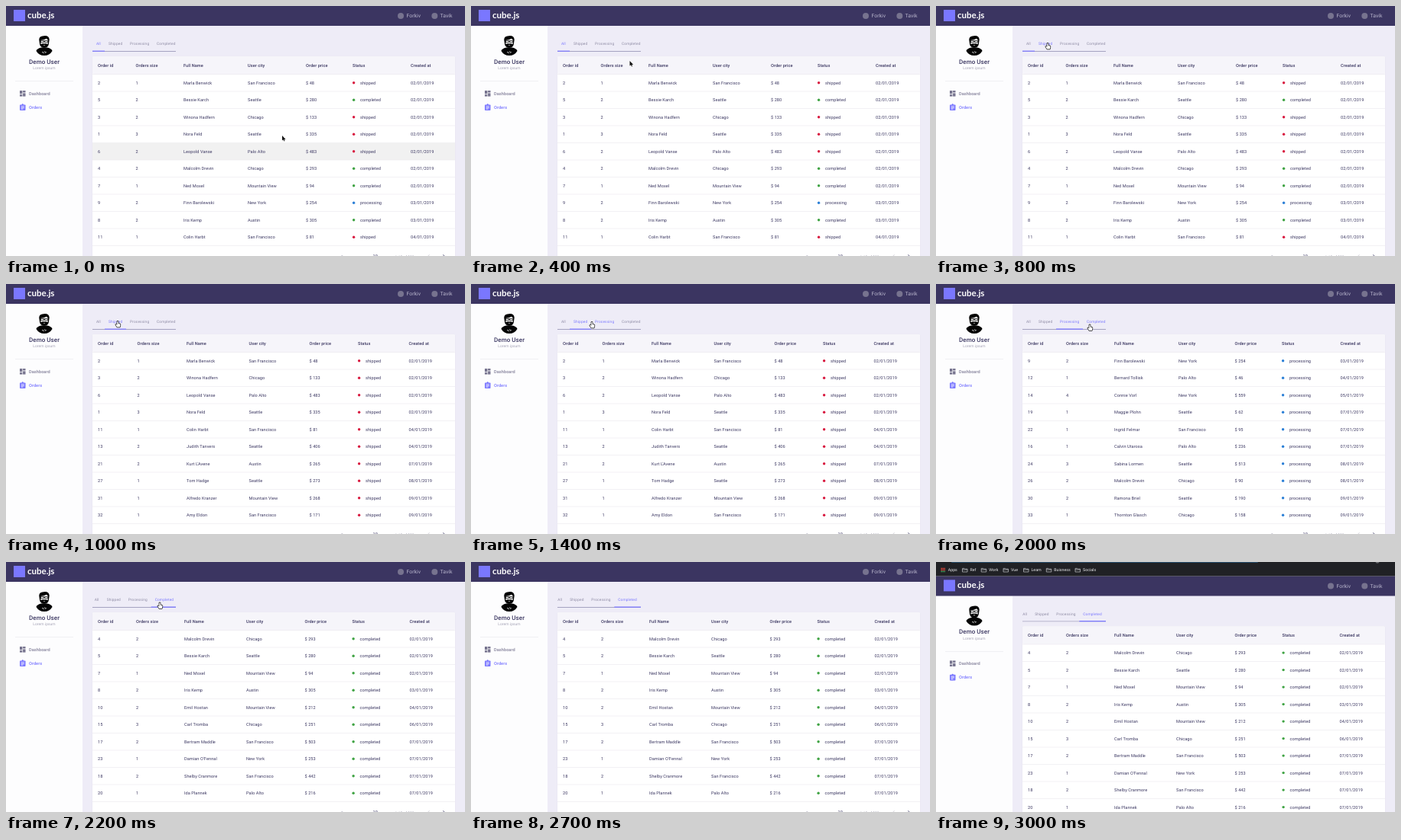
Animation, 600 px wide and 328 px high, one loop 3.3 s. Source, as an HTML page with a canvas:

```html
<!DOCTYPE html>
<html lang="en">
<head>
<meta charset="utf-8">
<title>Orders dashboard</title>
<style>
html, body { margin: 0; width: 100%; height: 100%; overflow: hidden; background: #eeecf7; }
canvas { display: block; width: 600px; height: 328px; }
</style>
</head>
<body>
<canvas id="stage"></canvas>
<script>
const canvas = document.getElementById('stage');
const ctx = canvas.getContext('2d');
const dpr = window.devicePixelRatio || 1;
canvas.width = 600 * dpr;
canvas.height = 328 * dpr;

const LOOP = 3300, STEP = 100, BAR = 18.4;
const INK = '#3d3963', ACCENT = '#7a77ff', MUTED = '#8d8aa3', NAVY = '#3b3561';
const STATUS = { shipped: '#d8193f', completed: '#3fa343', processing: '#2b7fd6' };

// id, size, name, city, price, status initial, day
const orders = {};
`2|1|Marla Benwick|San Francisco|48|s|2
5|2|Bessie Karch|Seattle|280|c|2
3|2|Winona Hadfern|Chicago|133|s|2
1|3|Nora Feld|Seattle|335|s|2
6|2|Leopold Vanse|Palo Alto|483|s|2
4|2|Malcolm Drevin|Chicago|293|c|2
7|1|Ned Moxel|Mountain View|94|c|2
9|2|Finn Barolewski|New York|254|p|3
8|2|Iris Kemp|Austin|305|c|3
11|1|Colin Harbt|San Francisco|81|s|4
13|2|Judith Tanvers|Seattle|406|s|4
21|2|Kurt L'Avene|Austin|265|s|7
27|1|Tom Hadge|Seattle|273|s|8
31|1|Alfredo Kranzer|Mountain View|268|s|9
32|1|Amy Eldon|San Francisco|171|s|9
12|1|Bernard Tollisk|Palo Alto|46|p|4
14|4|Connie Vorl|New York|559|p|5
19|1|Maggie Plohn|Seattle|62|p|7
22|1|Ingrid Felmar|San Francisco|95|p|7
16|1|Calvin Utarosa|Palo Alto|236|p|7
24|3|Sabina Lormen|Seattle|513|p|8
26|2|Malcolm Drevin|Chicago|90|p|8
30|2|Ramona Briel|Seattle|190|p|9
33|1|Thornton Glasch|Chicago|158|p|9
10|2|Emil Hostan|Mountain View|212|c|4
15|3|Carl Tromba|Chicago|251|c|6
17|2|Bertram Maddle|San Francisco|503|c|7
23|1|Damian O'Fennal|New York|253|c|7
18|2|Shelby Cranmore|San Francisco|442|c|7
20|1|Ida Plannek|Palo Alto|216|c|7`.split('\n').forEach(line => {
  const [id, size, name, city, price, initial, day] = line.split('|');
  const status = Object.keys(STATUS).find(s => s[0] === initial);
  orders[id] = [id, size, name, city, '$ ' + price, status, `0${day}/01/2019`];
});

const HEADS = ['Order id', 'Orders size', 'Full Name', 'User city', 'Order price', 'Status', 'Created at'];
const VIEWS = [
  { ids: [2, 5, 3, 1, 6, 4, 7, 9, 8, 11], cols: [120, 169.5, 232, 316, 392, 453, 529] },
  { ids: [2, 3, 6, 1, 11, 13, 21, 27, 31, 32], cols: [120, 171.5, 236, 317.5, 396.5, 460, 526.5] },
  { ids: [9, 12, 14, 19, 22, 16, 24, 26, 30, 33], cols: [120, 170, 233, 317, 390.5, 452, 528.5] },
  { ids: [4, 5, 7, 8, 10, 15, 17, 23, 18, 20], cols: [120, 170, 233, 314, 390.5, 452.5, 527.5] }
];
const TABS = ['All', 'Shipped', 'Processing', 'Completed'];
const EDGES = [113, 129, 157, 192, 226.7];

// Keyframes: [step, value, ...]
const TAB_POS = [[8, 0], [9, .7], [10, 1], [15, 1], [16, 1.7], [17, 2], [20, 2], [21, 2.7], [22, 3]];
const TAB_SCROLL = [[21, 0], [23, 4.7]];
const BAR_SLIDE = [[28, 0], [30, BAR]];
const POINTER = [[0, 361, 170], [1, 345, 152], [3, 250, 91], [5, 165, 53], [6, 146, 48.5],
  [12, 146, 48.5], [15, 164, 50], [18, 164, 50], [20, 201, 53]];

const ARROW = new Path2D('M0 0V6.6L1.5 5.3 2.5 7.4 3.5 7 2.6 4.9H4.6Z');
const HAND = new Path2D('M-.7 .7Q0-.3 .7 .7V3.2L3 3.9Q3.8 4.3 3.5 5.6L2.8 8H-.8L-2.8 5Q-2.6 4-1.4 4.6L-.7 5.2Z');

function at(keys, t, i = 1) {
  const next = keys.findIndex(k => k[0] > t);
  if (next < 0) return keys[keys.length - 1][i];
  if (next === 0) return keys[0][i];
  const a = keys[next - 1], b = keys[next];
  return a[i] + (b[i] - a[i]) * (t - a[0]) / (b[0] - a[0]);
}

function rect(x, y, w, h, color, r = 0) {
  ctx.fillStyle = color;
  ctx.beginPath();
  ctx.roundRect(x, y, w, h, r);
  ctx.fill();
}

function disc(x, y, r, color) {
  ctx.fillStyle = color;
  ctx.beginPath();
  ctx.arc(x, y, r, 0, 7);
  ctx.fill();
}

function shape(d, fill, stroke, width = 1) {
  const path = typeof d === 'string' ? new Path2D(d) : d;
  if (stroke) {
    ctx.strokeStyle = stroke;
    ctx.lineWidth = width;
    ctx.stroke(path);
  }
  if (fill) {
    ctx.fillStyle = fill;
    ctx.fill(path);
  }
}

// y is the middle of the capitals
function text(s, x, y, { size = 5.6, color = INK, weight = 400, align = 'left', gap = .06, font = 'Roboto' } = {}) {
  ctx.font = `${weight} ${size}px ${font}, sans-serif`;
  ctx.letterSpacing = gap + 'px';
  ctx.textAlign = align;
  ctx.fillStyle = color;
  ctx.fillText(s, x, y + size * .355);
}

function drawHeader() {
  rect(0, 0, 600, 26, NAVY);
  rect(10, 5, 15, 15, ACCENT);
  text('cube.js', 28, 12, { size: 11.5, color: '#fff', weight: 700, gap: 0, font: 'Lato' });
  const link = { size: 6.8, color: '#b9b6cd' };
  disc(516, 13, 4, '#77738f');
  text('Forkiv', 523.5, 13, link);
  disc(560.3, 13, 4, '#77738f');
  text('Tavik', 567.5, 13, link);
}

function drawAvatar() {
  shape('M39.5 59Q40 56 46 54.5H54Q60 56 60.5 59Q57 65 50 65Q43 65 39.5 59Z', '#050505');
  shape('M43.6 47Q42 40 47.5 39.5Q56 37.5 56.7 44L56.3 47Q56 55 50 55Q44 55 43.6 47Z', '#050505');
  shape('M45 45Q50 44.5 53 42.8Q55 44 55 46L54.6 50Q52 49 50 49.4Q48 49 45.4 50Z', '#fff');
  shape('M48.5 51.2H51.5L50 52Z', '#fff');
  ctx.lineWidth = .7;
  ctx.strokeStyle = '#050505';
  ctx.strokeRect(45.6, 45.6, 3.6, 2.2);
  ctx.strokeRect(50.8, 45.6, 3.6, 2.2);
  shape('M49 46.2H51', null, '#050505', .6);
  text('</>', 50, 60.5, { size: 4.2, color: '#fff', weight: 700, align: 'center' });
}

function drawSidebar() {
  rect(0, 26, 100, 302, '#fdfdfe');
  drawAvatar();
  text('Demo User', 50, 73, { size: 8, weight: 500, align: 'center' });
  text('Lorem ipsum', 50, 81.7, { size: 4.9, color: '#a3a1b5', align: 'center', gap: .08 });
  rect(12, 98.6, 76, .5, '#e4e3ea');

  for (const [x, y, h] of [[18, 111, 4.2], [22.1, 111, 2.5], [18, 116.1, 2.5], [22.1, 114.4, 4.2]])
    rect(x, y, 3.4, h, '#77748f');
  text('Dashboard', 30, 115, { color: '#817e98', weight: 500 });

  rect(18, 129.4, 7.5, 7.7, ACCENT, .8);
  disc(21.75, 129.4, 1.1, ACCENT);
  [131.3, 133, 134.7].forEach((y, i) => rect(19.6, y, i < 2 ? 4.3 : 2.9, .8, '#fff'));
  text('Orders', 30, 133, { color: ACCENT, weight: 500 });
}

function drawTabs(step, hover) {
  const pos = at(TAB_POS, step);
  const selected = step < 8 ? 0 : Math.ceil(Math.max(pos, 1));
  const i = Math.min(Math.floor(pos), 2), part = pos - i;
  const edge = n => EDGES[n] + (EDGES[n + 1] - EDGES[n]) * part;
  ctx.save();
  ctx.beginPath();
  ctx.rect(113, 40, 109, 21);
  ctx.clip();
  rect(113, 59.1, 109, .8, '#a5a2c0');
  ctx.translate(-at(TAB_SCROLL, step), 0);
  TABS.forEach((name, n) => text(name, EDGES[n] + 5, 49.5, {
    size: 4.8, gap: .137, color: n === selected || n === hover ? ACCENT : MUTED
  }));
  const right = i + 2 < EDGES.length ? edge(i + 1) : EDGES[4];
  rect(edge(i), 58.6, right - edge(i), 1.2, ACCENT);
  ctx.restore();
}

function drawTable({ ids, cols }, hoverRow) {
  rect(112.6, 65.8, 474.8, 290, '#e6e4ef', 2);
  rect(113, 66, 474, 290, '#fff', 2);
  rect(113, 66, 474, 23.5, '#f6f5fa', 2);
  HEADS.forEach((head, c) => text(head, cols[c], 78, { weight: 500 }));
  rect(113, 89.3, 474, .5, '#e5e4ea');
  ids.forEach((id, r) => {
    const y = 100.7 + 22.5 * r;
    if (r === hoverRow) rect(113, y - 11.2, 474, 22.5, '#f1f1f1');
    rect(113, y + 11.1, 474, .5, '#e5e4ea');
    orders[id].forEach((value, c) => {
      if (c === 5) disc(cols[c] + 1.6, y, 1.7, STATUS[value]);
      text(value, cols[c] + (c === 5 ? 10 : 0), y);
    });
  });
  const small = { size: 4.8, color: '#74718a' };
  text('Rows per page:', 438, 328.8, small);
  text('10', 479.5, 328.3, { size: 5.6 });
  shape('M489 328H492L490.5 329.5Z', '#74718a');
  text('1-10 of 289', 508.5, 328.8, small);
  shape('M553.5 326.2L551.3 328.5 553.5 330.8', null, '#c4c2cf', .8);
  shape('M571.3 326.2L573.5 328.5 571.3 330.8', null, INK, .8);
}

function drawSpinner() {
  ctx.strokeStyle = '#e0245e';
  ctx.lineWidth = 1.4;
  ctx.beginPath();
  ctx.arc(350, 86, 7.3, -1.05, -.72);
  ctx.stroke();
}

function drawBookmarks() {
  rect(0, -BAR, 600, BAR, '#202125');
  rect(20, -BAR, 401, 1.1, '#29506f', [0, 0, 1, 1]);
  disc(577, -BAR - .8, 2.6, '#6b6c70');
  const y = 10.6 - BAR;
  for (let n = 0; n < 9; n++)
    rect(6.5 + n % 3 * 2, y - 2.8 + Math.floor(n / 3) * 2, 1.5, 1.5, ['#e5483b', '#e5483b', '#3fa45b'][Math.floor(n / 3)]);
  const label = { size: 5.3, color: '#e8e9eb', gap: 0 };
  text('Apps', 15.7, y, label);
  [['Ref', 44.5], ['Work', 69.2], ['Vue', 98], ['Learn', 124.5], ['Buisness', 154.3], ['Socials', 192]].forEach(([name, x]) => {
    ctx.save();
    ctx.translate(x - 10, y);
    shape('M0-2.2H2.5L3.2-1.4H6.5V2.4H0ZM0-.6H6.5', null, '#c4c6ca', .7);
    ctx.restore();
    text(name, x, y, label);
  });
}

function drawPointer(x, y, hand) {
  ctx.save();
  ctx.translate(x, y);
  ctx.lineJoin = 'round';
  if (hand) shape(HAND, '#fff', '#111', 1.3);
  else shape(ARROW, '#111', '#fff', 1);
  ctx.restore();
}

function currentView(step) {
  if ([9, 16, 21].includes(step)) return null;
  return VIEWS[[9, 16, 21].filter(s => s < step).length];
}

function draw(step) {
  const x = at(POINTER, step), y = at(POINTER, step, 2);
  const visible = step < 25;
  const onTabs = y < 60;
  const hoverTab = visible && onTabs ? EDGES.findLastIndex(e => e <= x) : -1;
  const hoverRow = onTabs ? -1 : Math.floor((y + 17 - 89.5) / 22.5);
  const view = currentView(step);

  ctx.setTransform(dpr, 0, 0, dpr, 0, 0);
  ctx.textRendering = 'geometricPrecision';
  rect(0, 0, 600, 328, '#eeecf7');
  ctx.translate(0, at(BAR_SLIDE, step));
  drawSidebar();
  drawHeader();
  drawTabs(step, hoverTab);
  if (view) drawTable(view, hoverRow);
  else drawSpinner();
  drawBookmarks();
  if (visible) drawPointer(x, y, onTabs);
}

const start = performance.now();
function tick() {
  draw(Math.floor((performance.now() - start) % LOOP / STEP));
  requestAnimationFrame(tick);
}
tick();
</script>
</body>
</html>
```
